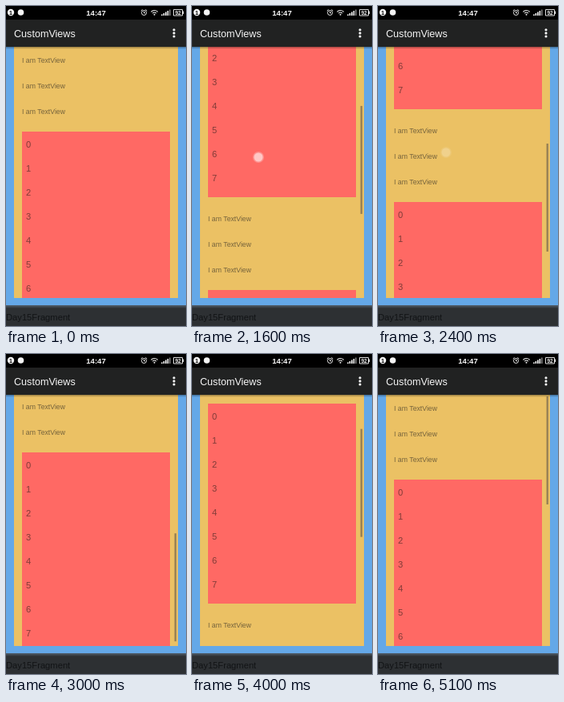
These frames come from a looping animation (225 px wide and 400 px high, 5.2 s). An HTML page with a canvas:

```html
<!DOCTYPE html>
<html lang="en">
<head>
<meta charset="utf-8">
<title>CustomViews</title>
<style>
html, body { margin: 0; width: 100%; height: 100%; overflow: hidden; background: #000; }
canvas { display: block; width: 225px; height: 400px; }
</style>
</head>
<body>
<canvas id="stage"></canvas>
<script>
const W = 225, H = 400, LOOP = 5200, STEP = 100;
const FONT = '"Liberation Sans", Arial, sans-serif';
const VIEW = { top: 51, bottom: 365 };
const LIST_H = 250, LIST_PITCH = 366, BAR_RATIO = 0.428;

// [time, scroll offset]
const scrollKeys = [
  [0, 0], [400, 0], [1100, 82], [1300, 106], [1600, 168], [2000, 208],
  [2400, 278], [3000, 400], [3200, 405], [3600, 320], [4000, 95],
  [4300, -16], [4800, 0], [5200, 0]
];

// Each finger keeps hold of the content between its start and end.
const touches = [
  { from: 400, to: 1100, x: 84, y: 207, scroll: 82 },
  { from: 1300, to: 1600, x: 83, y: 189, scroll: 168 },
  { from: 2100, to: 2300, x: 85, y: 183, scroll: 278 },
  { from: 3300, to: 3500, x: 89, y: 292, scroll: 320 }
];

const canvas = document.getElementById('stage');
const ctx = canvas.getContext('2d');
const dpr = window.devicePixelRatio || 1;
canvas.width = W * dpr;
canvas.height = H * dpr;
ctx.scale(dpr, dpr);

function rect(x, y, w, h, color) {
  ctx.fillStyle = color;
  ctx.fillRect(x, y, w, h);
}

function disc(x, y, r, color) {
  ctx.fillStyle = color;
  ctx.beginPath();
  ctx.arc(x, y, r, 0, Math.PI * 2);
  ctx.fill();
}

function stroke(color, width, path) {
  ctx.strokeStyle = color;
  ctx.lineWidth = width;
  ctx.beginPath();
  path();
  ctx.stroke();
}

function label(str, x, y, size, color, align = 'left', weight = 'normal') {
  ctx.font = `${weight} ${size}px ${FONT}`;
  ctx.textAlign = align;
  ctx.textBaseline = 'alphabetic';
  ctx.fillStyle = color;
  ctx.fillText(str, x, y + size * 0.36);
}

function shade(y, h, from, to) {
  const g = ctx.createLinearGradient(0, y, 0, y + h);
  g.addColorStop(0, from);
  g.addColorStop(1, to);
  rect(0, y, W, h, g);
}

// Monotone cubic interpolation: smooth, without overshooting a key.
function scrollAt(t) {
  const k = scrollKeys;
  const slope = i => (k[i + 1][1] - k[i][1]) / (k[i + 1][0] - k[i][0]);
  const tangent = i => {
    if (i === 0 || i === k.length - 1) return 0;
    const a = slope(i - 1), b = slope(i);
    return a * b <= 0 ? 0 : 2 * a * b / (a + b);
  };
  let i = 0;
  while (i < k.length - 2 && t >= k[i + 1][0]) i++;
  const d = k[i + 1][0] - k[i][0], u = (t - k[i][0]) / d, v = 1 - u;
  return k[i][1] * v * v * (1 + 2 * u) + k[i + 1][1] * u * u * (3 - 2 * u)
    + d * u * v * (tangent(i) * v - tangent(i + 1) * u);
}

function drawSection(listTop) {
  for (let i = 0; i < 3; i++) {
    label('I am TextView', 20, listTop - 89 + i * 32, 8.7, '#74623c');
  }
  rect(20, listTop, 185, LIST_H, '#ff6964');
  for (let i = 0; i < 8; i++) {
    label(String(i), 25, listTop + 15.7 + i * 30, 11.2, '#803c38');
  }
}

function drawScrollBar(scroll) {
  const top = 53 + scroll * BAR_RATIO;
  const y = Math.max(52, top);
  const bottom = scroll < 0 ? top + 138 : top + 135;
  rect(210.5, y, 2.5, bottom - y, 'rgba(100,90,75,.6)');
}

function drawTouch(t, scroll) {
  for (const p of touches) {
    const fading = t > p.to;
    if (t < p.from || t > p.to + 100) continue;
    const y = p.y + p.scroll - scroll;
    disc(p.x, y, 7, `rgba(255,255,255,${fading ? 0.1 : 0.25})`);
    disc(p.x, y, 5.5, `rgba(255,255,255,${fading ? 0.18 : 0.5})`);
  }
}

function drawStatusBar() {
  rect(0, 0, W, 17, '#000');
  disc(6, 8, 4.2, '#f4f4f4');
  label('1', 6, 8, 7, '#000', 'center', 'bold');
  disc(18.5, 8, 3.8, '#f4f4f4');
  label('14:47', 112.5, 8.3, 9.6, '#f4f4f4', 'center', 'bold');

  // alarm clock
  stroke('#eee', 1, () => {
    ctx.arc(172.5, 8.5, 3, 0, Math.PI * 2);
    ctx.moveTo(172.5, 6.8); ctx.lineTo(172.5, 8.7); ctx.lineTo(174, 8.7);
    ctx.moveTo(168.8, 6); ctx.lineTo(170.6, 4.4);
    ctx.moveTo(174.4, 4.4); ctx.lineTo(176.2, 6);
  });
  // wireless arcs
  for (const r of [3, 5.5]) {
    stroke('#eee', 1.1, () => ctx.arc(185.5, 11, r, -Math.PI * 0.77, -Math.PI * 0.23));
  }
  disc(185.5, 10.8, 1, '#eee');
  // signal bars
  for (let i = 0; i < 5; i++) {
    const h = 1.5 + i * 1.5;
    rect(194 + i * 2.5, 12 - h, 1.7, h, i < 4 ? '#eee' : '#777');
  }
  // battery
  stroke('#ddd', 1, () => ctx.rect(209.5, 4.5, 11, 7.5));
  rect(221, 6.5, 1.2, 3.5, '#ddd');
  label('92', 215, 8.3, 6.5, '#eee', 'center', 'bold');
}

function drawChrome() {
  shade(VIEW.top, 3, 'rgba(0,0,0,.35)', 'rgba(0,0,0,0)');
  rect(0, 17, W, 34, '#212222');
  label('CustomViews', 10, 34, 12.6, '#f5f5f5');
  for (const y of [29.8, 33.9, 38]) disc(210, y, 1.55, '#f5f5f5');
  drawStatusBar();

  rect(0, 375, W, 25, '#2d3033');
  shade(374, 4, '#53616e', '#2d3033');
  label('Day15Fragment', 0, 389, 11.2, '#121416');
}

function draw(t) {
  const scroll = scrollAt(t);
  const listTop = 157 - scroll;

  rect(0, 0, W, H, '#64a8e8');
  ctx.save();
  ctx.beginPath();
  ctx.rect(0, VIEW.top, W, VIEW.bottom - VIEW.top);
  ctx.clip();
  rect(10, listTop - 106, 205, 800, '#ebc164');
  drawSection(listTop);
  drawSection(listTop + LIST_PITCH);
  if (t >= 400) drawScrollBar(scroll);
  ctx.restore();

  drawTouch(t, scroll);
  drawChrome();
}

const start = performance.now();
function tick() {
  const t = (performance.now() - start) % LOOP;
  draw(Math.floor(t / STEP) * STEP);
  requestAnimationFrame(tick);
}
tick();
</script>
</body>
</html>
```
